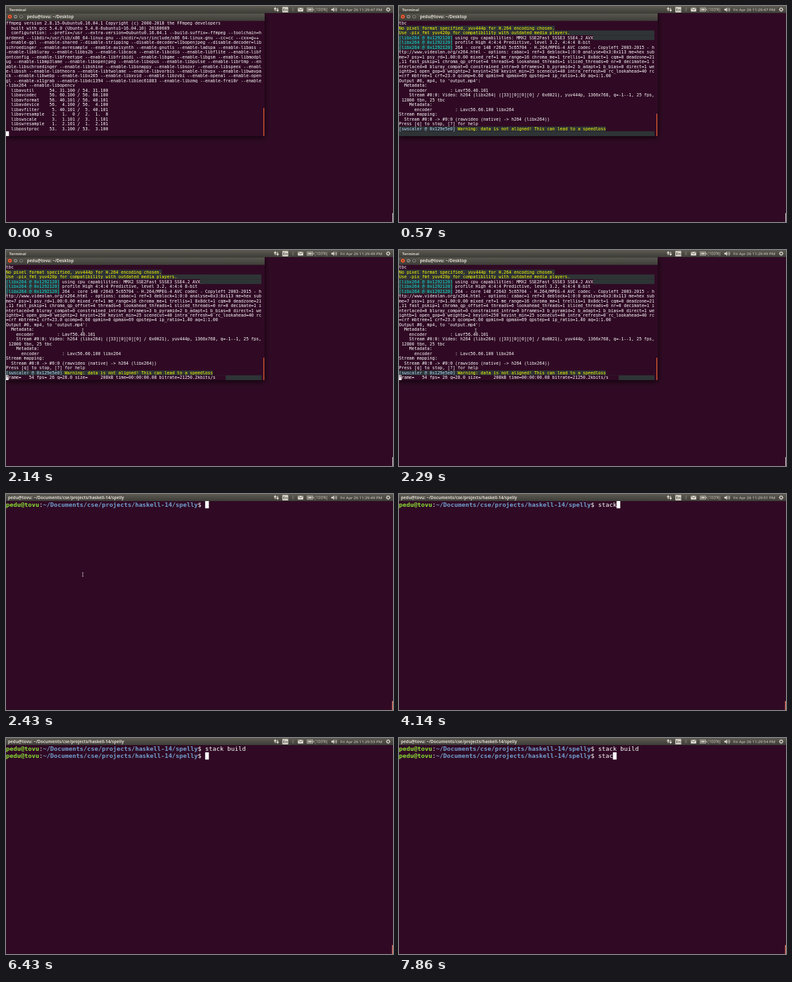
Recreate the animation shown at these times as an HTML page with a canvas. Size 600 px wide and 337 px high, loop 8 s.

```html
<!DOCTYPE html>
<html>
<head>
<meta charset="utf-8">
<title>Terminal session</title>
<style>
html, body { margin: 0; width: 600px; height: 337px; overflow: hidden; background: #300a24; }
canvas { display: block; }
</style>
</head>
<body>
<canvas id="stage" width="600" height="337"></canvas>
<script>
const c = document.getElementById('stage').getContext('2d');
const BG = '#300a24', SLATE = '#2e3436', YELLOW = '#ffff00', CYAN = '#10dcdc';
const HOST = 'pedu@tovu', PATH = '~/Documents/cse/projects/haskell-14/spelly';
const SANS = '"Open Sans", "Noto Sans", sans-serif';
const MONO = '"DejaVu Sans Mono", monospace';
const COLS = 100;
const small = { x: 0, y: 23.2, w: 3.96, h: 7.49, base: 5.9, size: 6.578 };
const large = { x: 0, y: 11, w: 5.718, h: 11.3, base: 9, size: 9.5 };

const wrap = lines => lines.flatMap(s => s.match(new RegExp(`.{1,${COLS}}`, 'g')));

const config = ('  configuration: --prefix=/usr --extra-version=0ubuntu0.16.04.1 --build-suffix=-ffmpeg ' +
  '--toolchain=hardened --libdir=/usr/lib/x86_64-linux-gnu --incdir=/usr/include/x86_64-linux-gnu ' +
  '--cc=cc --cxx=g++ +gpl +shared --disable-stripping --disable-decoder=libopenjpeg ' +
  '--disable-decoder=libschroedinger +avresample +avisynth +gnutls +ladspa +libass +libbluray ' +
  '+libbs2b +libcaca +libcdio +libflite +libfontconfig +libfreetype +libfribidi +libgme +libgsm ' +
  '+libmodplug +libmp3lame +libopenjpeg +libopus +libpulse +librtmp +libschroedinger +libshine ' +
  '+libsnappy +libsoxr +libspeex +libssh +libtheora +libtwolame +libvorbis +libvpx +libwavpack ' +
  '+libwebp +libx265 +libxvid +libzvbi +openal +opengl +x11grab +libdc1394 +libiec61883 +libzmq ' +
  '+frei0r +libx264 +libopencv').replace(/\+(?=\w)/g, '--enable-');

const versions = [
  ['avutil', '54. 31.100'], ['avcodec', '56. 60.100'], ['avformat', '56. 40.101'],
  ['avdevice', '56.  4.100'], ['avfilter', ' 5. 40.101'], ['avresample', ' 2.  1.  0'],
  ['swscale', ' 3.  1.101'], ['swresample', ' 1.  2.101'], ['postproc', '53.  3.100']
].map(([name, v]) => '  ' + ('lib' + name).padEnd(15) + `${v} / ${v}`);

const banner = wrap([
  'ffmpeg version 2.8.15-0ubuntu0.16.04.1 Copyright (c) 2000-2018 the FFmpeg developers',
  '  built with gcc 5.4.0 (Ubuntu 5.4.0-6ubuntu1~16.04.10) 20160609',
  config, ...versions
]);

const x264 = '[libx264 @ 0x1292120]', scaler = '[swscaler @ 0x129e5e0]';
const encoding = wrap([
  'tbc',
  'No pixel format specified, yuv444p for H.264 encoding chosen.',
  'Use -pix_fmt yuv420p for compatibility with outdated media players.',
  x264 + ' using cpu capabilities: MMX2 SSE2Fast SSSE3 SSE4.2 AVX',
  x264 + ' profile High 4:4:4 Predictive, level 3.2, 4:4:4 8-bit',
  x264 + ' 264 - core 148 r2643 5c65704 - H.264/MPEG-4 AVC codec - Copyleft 2003-2015 - ' +
    'http://www.videolan.org/x264.html - options: cabac=1 ref=3 deblock=1:0:0 analyse=0x3:0x113 me=hex ' +
    'subme=7 psy=1 psy_rd=1.00:0.00 mixed_ref=1 me_range=16 chroma_me=1 trellis=1 8x8dct=1 cqm=0 ' +
    'deadzone=21,11 fast_pskip=1 chroma_qp_offset=4 threads=6 lookahead_threads=1 sliced_threads=0 nr=0 ' +
    'decimate=1 interlaced=0 bluray_compat=0 constrained_intra=0 bframes=3 b_pyramid=2 b_adapt=1 ' +
    'b_bias=0 direct=1 weightb=1 open_gop=0 weightp=2 keyint=250 keyint_min=25 scenecut=40 ' +
    'intra_refresh=0 rc_lookahead=40 rc=crf mbtree=1 crf=23.0 qcomp=0.60 qpmin=0 qpmax=69 qpstep=4 ' +
    'ip_ratio=1.40 aq=1:1.00',
  "Output #0, mp4, to 'output.mp4':",
  '  Metadata:',
  '    encoder         : Lavf56.40.101',
  '    Stream #0:0: Video: h264 (libx264) ([33][0][0][0] / 0x0021), yuv444p, 1366x768, q=-1--1, 25 fps, 12800 tbn, 25 tbc',
  '    Metadata:',
  '      encoder         : Lavc56.60.100 libx264',
  'Stream mapping:',
  '  Stream #0:0 -> #0:0 (rawvideo (native) -> h264 (libx264))',
  'Press [q] to stop, [?] for help'
]);

// Progress line: [start ms, text]
const idle = 'size=       0kB time=00:00:00.00 bitrate=N/A    ';
const progress = [
  [710, 'frame=   15 fps=0.0 q=0.0 ' + idle],
  [1140, 'frame=   28 fps= 27 q=0.0 ' + idle],
  [1570, 'frame=   41 fps= 27 q=0.0 ' + idle],
  [2000, 'frame=   54 fps= 26 q=28.0 size=     208kB time=00:00:00.08 bitrate=21250.2kbits/s    ']
];

function rect(x, y, w, h, color) {
  c.fillStyle = color;
  c.fillRect(x, y, w, h);
}

function disc(x, y, r, color) {
  c.fillStyle = color;
  c.beginPath();
  c.arc(x, y, r, 0, 7);
  c.fill();
}

function line(color, width, ...points) {
  c.strokeStyle = color;
  c.lineWidth = width;
  c.beginPath();
  points.forEach(([x, y], i) => i ? c.lineTo(x, y) : c.moveTo(x, y));
  c.stroke();
}

// Text is set large and scaled down so glyph advances stay fractional.
function text(s, x, y, size, color, font = SANS, weight = 400) {
  c.save();
  c.translate(x, y);
  c.scale(.1, .1);
  c.font = `${weight} ${size * 10}px ${font}`;
  c.fillStyle = color;
  c.fillText(s, 0, 0);
  c.restore();
}

function cells(g, row, col, n, color) {
  rect(g.x + col * g.w, g.y + row * g.h, n * g.w, g.h, color);
}

function put(g, s, row, col = 0, color = '#fff', bg, weight) {
  if (bg) cells(g, row, col, s.length, bg);
  text(s, g.x + col * g.w, g.y + row * g.h + g.base, g.size, color, MONO, weight);
}

function bar(y, h, w, top, bottom) {
  const g = c.createLinearGradient(0, y, 0, y + h);
  g.addColorStop(0, top);
  g.addColorStop(1, bottom);
  rect(0, y, w, h, g);
}

function panel(t, title, x, size) {
  const ink = '#dfdbd2';
  bar(0, 11, 600, '#5c5a51', '#3e3d38');
  text(title, x, 7.6, size, ink, SANS, 700);
  line(ink, 1.2, [417.3, 8], [417.3, 3], [415.6, 5], [417.3, 3], [419, 5]);
  line(ink, 1.2, [421, 3], [421, 8], [419.4, 6], [421, 8], [422.7, 6]);
  rect(428.5, 1.5, 9, 8.5, '#d8d4ca');
  text('En', 429.6, 7.9, 6, '#45433d', SANS, 600);
  line('#77746a', .7, [443.2, 4], [446.3, 7], [444.8, 8.7], [444.8, 2.3], [446.3, 4], [443.2, 7]);
  rect(452.5, 2.8, 8.3, 5.8, ink);
  line('#4b4942', .8, [452.7, 3.2], [456.6, 6], [460.6, 3.2]);
  c.strokeStyle = '#c6c2b8';
  c.lineWidth = .9;
  c.strokeRect(467, 3, 8.5, 5.2);
  rect(468.3, 4.2, 5.9, 2.8, '#c6c2b8');
  rect(476, 4.6, 1, 2, '#c6c2b8');
  text('(100%)', 478.3, 7.6, 6.4, '#c8c4ba');
  rect(504.5, 4.3, 2, 2.8, ink);
  line(ink, 1.2, [506.3, 5.7], [508, 3.6], [508, 7.8], [506.3, 5.7]);
  c.lineWidth = .7;
  for (const r of [1.6, 3.2, 4.6]) {
    c.beginPath();
    c.arc(508.3, 5.7, r, -.8, .8);
    c.stroke();
  }
  const sec = 47 + Math.floor(t / 1000);
  text(`Fri Apr 26 11:29:${sec} PM`, 518.3, 7.6, 6.2, ink);
  for (let i = 0; i < 8; i++) {
    const a = i * Math.PI / 4, dx = Math.cos(a), dy = Math.sin(a);
    line(ink, 1, [592.5 + dx * 2, 5.6 + dy * 2], [592.5 + dx * 3.6, 5.6 + dy * 3.6]);
  }
  disc(592.5, 5.6, 2.5, ink);
  disc(592.5, 5.6, 1.5, '#4d4b44');
}

function pointer() {
  line('#b9b3b7', .8, [117.8, 122.8], [120.2, 122.8]);
  line('#b9b3b7', .8, [119, 122.8], [119, 128.4]);
  line('#b9b3b7', .8, [117.8, 128.4], [120.2, 128.4]);
}

function drawEncoding(t) {
  const g = small, tag = x264.length;
  // Lines opened after coloured output keep its background.
  cells(g, 1, 0, encoding[1].length, SLATE);
  for (const row of [2, 3, 23]) cells(g, row, 0, COLS, SLATE);
  cells(g, 3, tag, encoding[3].length - tag, BG);
  encoding.forEach((s, row) => {
    if (s.startsWith(x264)) {
      put(g, x264, row, 0, CYAN, SLATE);
      put(g, s.slice(tag), row, tag);
    } else put(g, s, row, 0, row === 1 || row === 2 ? YELLOW : '#fff');
  });
  put(g, scaler + ' ', 22, 0, '#afd7ff', SLATE);
  put(g, 'Warning: data is not aligned! This can lead to a speedloss', 22, 23, YELLOW, SLATE);
  const status = progress.filter(p => p[0] <= t).pop();
  if (status) {
    put(g, status[1], 23, 0, '#fff', BG);
    put(g, 'f', 23, 0, BG, '#fff');
  }
}

function titleBar() {
  bar(11, 12.2, 401, '#5a5850', '#3e3d38');
  rect(0, 11, 401, .6, '#33322e');
  const [x, y, step] = [6, 16.6, 8.8];
  ['#ee6138', '#84817a', '#84817a'].forEach((color, i) => {
    disc(x + i * step, y, 3.8, '#2d2c29');
    disc(x + i * step, y, 3.2, color);
  });
  line('#4b2018', .8, [x - 1.2, y - 1.2], [x + 1.2, y + 1.2]);
  line('#4b2018', .8, [x + 1.2, y - 1.2], [x - 1.2, y + 1.2]);
  line('#33322e', .9, [x + step - 1.4, y], [x + step + 1.4, y]);
  c.strokeStyle = '#33322e';
  c.strokeRect(x + 2 * step - 1.2, y - 1.2, 2.4, 2.4);
  text(HOST + ': ~/Desktop', 32.5, 18.7, 6.4, '#dfdbd2', SANS, 700);
}

function desktop(t) {
  rect(599, 323, 1, 14, '#d2cccc');
  c.save();
  c.shadowColor = 'rgba(0,0,0,.75)';
  c.shadowBlur = 9;
  c.shadowOffsetY = 2;
  rect(0, 11, 401, 192, BG);
  c.restore();
  titleBar();
  const started = t >= 140;
  if (started) drawEncoding(t);
  else {
    banner.forEach((s, i) => put(small, s, i));
    cells(small, 23, 0, 1.15, '#fff');
  }
  const thumb = started ? 168 : 159;
  rect(399, thumb, 1.4, 203 - thumb, '#d8592f');
  panel(t, 'Terminal', 5, 5.9);
  if (t >= 1290) pointer();
}

function prompt(row) {
  put(large, HOST, row, 0, '#8ae234', null, 700);
  put(large, ':', row, 9);
  put(large, PATH, row, 10, '#729fcf', null, 700);
  put(large, '$', row, 52);
}

const typed = (s, times, t) => s.slice(0, times.filter(k => k <= t).length);
const firstKeys = [3430, 3570, 3860, 4000, 4140, 4290, 4430, 4570, 4570, 4720, 4860];
const secondKeys = [7290, 7430, 7570, 7720];

function shell(t) {
  panel(t, HOST + ': ' + PATH, 3, 6.4);
  const first = typed('stack build', firstKeys, t), second = typed('stac', secondKeys, t);
  prompt(0);
  put(large, first, 0, 54);
  let row = 0, col = 54 + first.length;
  if (t >= 5140) [row, col] = [1, 0];
  if (t >= 6140) {
    prompt(1);
    put(large, second, 1, 54);
    col = 54 + second.length;
  }
  cells(large, row, col, 1, '#fff');
  rect(598.6, 323, 1.4, 14, '#e8836a');
  if (t < 3430) pointer();
}

function frame() {
  const t = performance.now() % 8000;
  rect(0, 0, 600, 337, BG);
  (t < 2430 ? desktop : shell)(t);
  requestAnimationFrame(frame);
}
frame();
</script>
</body>
</html>
```
